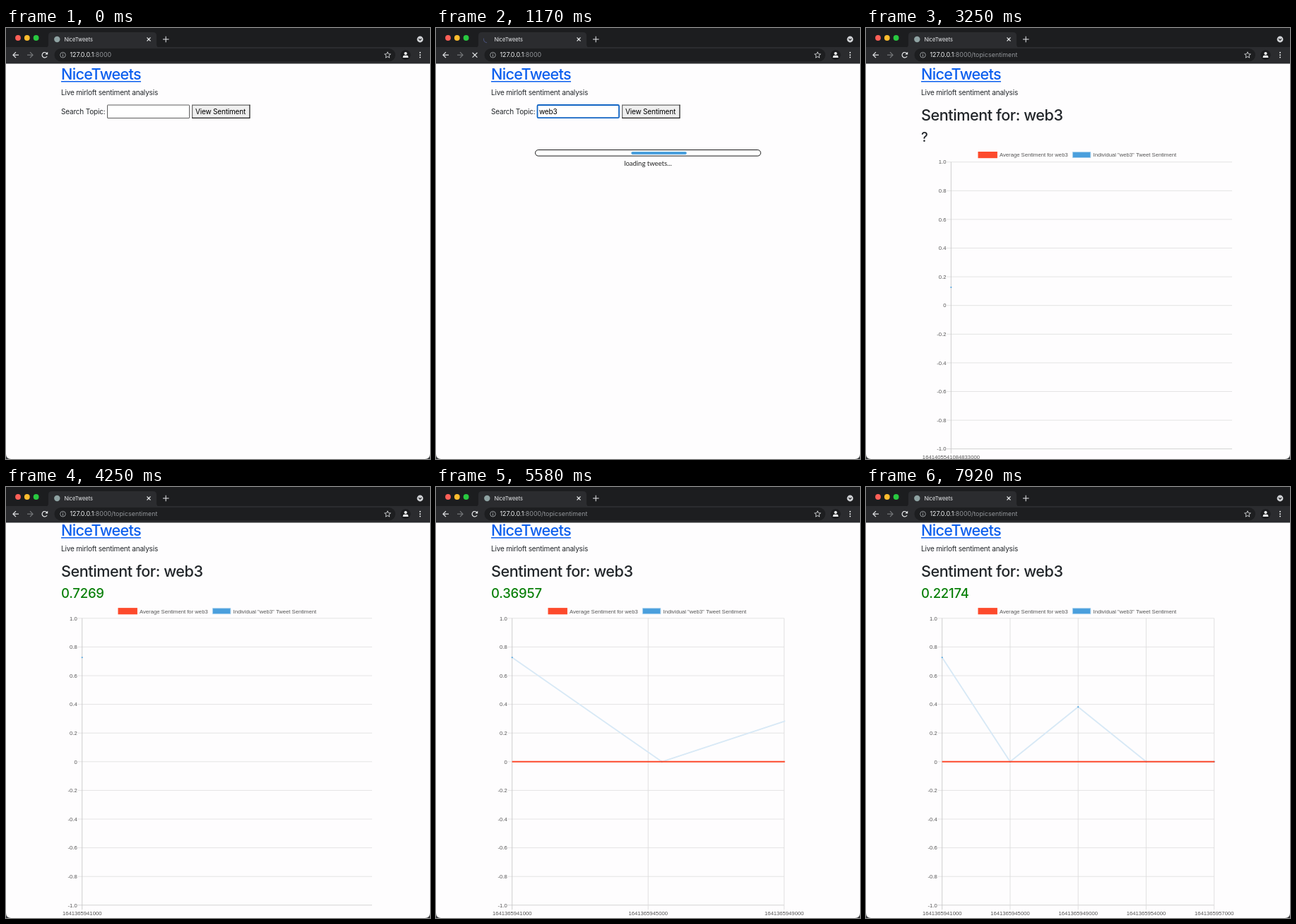
Recreate the animation shown at these times as an HTML page with a canvas. Size 600x610 px, loop 8000 ms.

```html
<!DOCTYPE html>
<html lang="en">
<head>
<meta charset="utf-8">
<title>NiceTweets</title>
<style>
html, body { margin: 0; width: 100%; height: 100%; overflow: hidden; background: #1d1e20; }
canvas { display: block; width: 600px; height: 610px; }
</style>
</head>
<body>
<canvas id="stage"></canvas>
<script>
const W = 600, H = 610, LOOP = 8000;
const canvas = document.getElementById('stage');
const dpr = window.devicePixelRatio || 1;
canvas.width = W * dpr;
canvas.height = H * dpr;
const ctx = canvas.getContext('2d');

const UI = 'Inter, "Open Sans", sans-serif';
const CHART = '"Liberation Sans", Arial, sans-serif';
const INK = '#212529', BLUE = '#4a9fdd', RED = '#fd4a2c';

// moments in ms
const FOCUS = 80, KEYS = [250, 340, 420, 500], SUBMIT = 876, LOADED = 3200, SCROLL = 3800;

// ---------- helpers ----------
function text(str, x, y, font, color, opt = {}) {
  ctx.font = font;
  ctx.fillStyle = color;
  ctx.textAlign = opt.align || 'left';
  ctx.letterSpacing = (opt.space || 0) + 'px';
  ctx.fillText(str, x, y);
  const width = ctx.measureText(str).width;
  ctx.letterSpacing = '0px';
  return width;
}

function rect(x, y, w, h, color) {
  ctx.fillStyle = color;
  ctx.fillRect(x, y, w, h);
}

function round(x, y, w, h, r, fill, stroke, lw = 1) {
  ctx.beginPath();
  ctx.roundRect(x, y, w, h, r);
  if (fill) { ctx.fillStyle = fill; ctx.fill(); }
  if (stroke) { ctx.strokeStyle = stroke; ctx.lineWidth = lw; ctx.stroke(); }
}

function disc(x, y, r, color) {
  ctx.beginPath();
  ctx.arc(x, y, r, 0, Math.PI * 2);
  ctx.fillStyle = color;
  ctx.fill();
}

function arc(x, y, r, from, to, color, lw) {
  ctx.beginPath();
  ctx.arc(x, y, r, from, to);
  ctx.strokeStyle = color;
  ctx.lineWidth = lw;
  ctx.stroke();
}

function path(points, color, lw) {
  ctx.beginPath();
  points.forEach(([x, y], i) => i ? ctx.lineTo(x, y) : ctx.moveTo(x, y));
  ctx.strokeStyle = color;
  ctx.lineWidth = lw;
  ctx.stroke();
}

function cross(x, y, r, color, lw) {
  path([[x - r, y - r], [x + r, y + r]], color, lw);
  path([[x + r, y - r], [x - r, y + r]], color, lw);
}

const clamp = v => Math.max(0, Math.min(1, v));
const mix = (a, b, k) => a + (b - a) * k;
const outQuart = p => 1 - Math.pow(1 - clamp(p), 4);

// ---------- browser window ----------
function arrow(x, y, dir, color) {
  path([[x - 4 * dir, y], [x + 4 * dir, y]], color, 1.2);
  path([[x, y - 4], [x + 4 * dir, y], [x, y + 4]], color, 1.2);
}

function star(x, y, r) {
  const pts = [];
  for (let i = 0; i <= 10; i++) {
    const a = -Math.PI / 2 + i * Math.PI / 5, q = i % 2 ? r * 0.45 : r;
    pts.push([x + q * Math.cos(a), y + q * Math.sin(a)]);
  }
  path(pts, '#d5d7da', 0.9);
}

function drawTab(t, busy) {
  rect(0, 0, W, 28, '#1c1d1f');
  ['#fe5f57', '#febc2e', '#28c840'].forEach((c, i) => disc(17 + i * 12.8, 14, 3.9, c));

  ctx.beginPath();
  ctx.moveTo(55, 28);
  ctx.quadraticCurveTo(60, 28, 60, 23);
  ctx.lineTo(60, 11);
  ctx.quadraticCurveTo(60, 6, 65, 6);
  ctx.lineTo(208, 6);
  ctx.quadraticCurveTo(213, 6, 213, 11);
  ctx.lineTo(213, 23);
  ctx.quadraticCurveTo(213, 28, 218, 28);
  ctx.fillStyle = '#2b2c2f';
  ctx.fill();

  if (busy) {
    const a = Math.PI * 0.5 - (t - 1170) / 910 * Math.PI * 3.8;
    arc(72, 16, 4.6, a, a + Math.PI * 0.6, '#464e72', 1.1);
  } else {
    disc(72.3, 16, 4.2, '#8fa3a3');
  }
  text('NiceTweets', 82.5, 18.8, '7.4px ' + UI, '#eceef0');
  cross(202, 16, 2.5, '#e6e8ea', 1.1);
  path([[222, 16], [230.5, 16]], '#d5d7da', 1.1);
  path([[226.2, 11.8], [226.2, 20.2]], '#d5d7da', 1.1);
  disc(586, 16, 4.4, '#cfd1d4');
  path([[584, 15.2], [586, 17.2], [588, 15.2]], '#1c1d1f', 1.2);
}

function drawToolbar(busy, url) {
  rect(0, 27, W, 23.5, '#2b2c2f');
  arrow(14, 38.2, -1, '#e6e8ea');
  arrow(34, 38.2, 1, '#77797c');
  if (busy) {
    cross(55, 38.2, 3.4, '#e6e8ea', 1.2);
  } else {
    arc(54.8, 38.2, 3.7, 0.5, Math.PI * 1.8, '#e6e8ea', 1.2);
    ctx.beginPath();
    ctx.moveTo(59.2, 33.8);
    ctx.lineTo(59.2, 37.6);
    ctx.lineTo(55.4, 37.6);
    ctx.fillStyle = '#e6e8ea';
    ctx.fill();
  }
  round(68.5, 29, 482.5, 18.5, 9.2, '#1d1e20');
  arc(80.5, 38.2, 3.8, 0, 7, '#a2a5a9', 0.9);
  rect(80, 37.6, 1, 2.8, '#a2a5a9');
  rect(80, 35.8, 1, 1, '#a2a5a9');
  const font = '8.9px ' + UI;
  const w = text('127.0.0.1', 90.5, 41.4, font, '#f1f3f4');
  text(url, 90.5 + w, 41.4, font, '#93969a');
  star(540, 38.4, 4.6);
  disc(565.5, 38.2, 7, '#1b1c1e');
  disc(565.5, 36, 2.1, '#f1f3f4');
  round(561.6, 38.8, 7.8, 3.2, [2.4, 2.4, 0.5, 0.5], '#f1f3f4');
  for (const y of [34.8, 38.2, 41.6]) disc(586, y, 1, '#e6e8ea');
}

function drawCorners() {
  ctx.fillStyle = '#37383b';
  for (const s of [0, 1]) {
    const x = s * W, d = s ? -7 : 7;
    ctx.beginPath();
    ctx.moveTo(x, H - 7);
    ctx.quadraticCurveTo(x, H, x + d, H);
    ctx.lineTo(x, H);
    ctx.fill();
  }
}

// ---------- page ----------
function drawHeader() {
  const w = text('NiceTweets', 78, 73, '500 21.6px ' + UI, '#0b5fee', { space: -0.67 });
  rect(78, 75, w, 1.5, '#0b5fee');
  text('Live mirloft sentiment analysis', 78, 94.6, '10px ' + UI, INK, { space: -0.18 });
}

function drawForm(t) {
  const font = '10px ' + UI, tight = { space: -0.18 };
  text('Search Topic:', 78, 122, font, INK, tight);
  const focus = t >= FOCUS;
  if (focus) round(143.5, 109, 115.5, 18.2, 1.5, '#fff', '#1265c4', 1.8);
  else round(143.5, 109, 116, 18.5, 0.5, '#fff', '#5d5d5d', 1);

  const typed = 'web3'.slice(0, KEYS.filter(k => t >= k).length);
  const w = text(typed, 146, 122, font, '#000', tight);
  const typing = t > KEYS[0] - 80 && t < KEYS[3] + 120;
  if (focus && (typing || Math.floor(t / 125) % 2 === 0)) rect(146 + w, 112.5, 0.8, 11.5, '#000');

  rect(263, 108.5, 82.5, 19.5, '#efefef');
  path([[263.6, 128], [263.6, 109.1], [345.5, 109.1]], '#6b6b6b', 1.2);
  path([[263.2, 127.4], [344.9, 127.4], [344.9, 108.7]], '#1c1c1c', 1.2);
  text('View Sentiment', 268, 122, font, '#000', tight);
}

function drawLoader(t) {
  round(140.5, 172.5, 319, 8.6, 4.3, '#fff', '#1a1a1a', 1);
  const u = (t - SUBMIT) / 522 % 2;
  const x = 144 + 234 * (u < 1 ? u : 2 - u);
  round(x, 174.9, 78.5, 4, 2, BLUE);
  text('loading tweets...', 300, 195.2, '9.5px Lato, "Open Sans", sans-serif', '#222', { align: 'center' });
}

// ---------- chart ----------
const scores = [0.7269, 0, 0.3818, 0, 0];
const seconds = [41, 45, 49, 54, 57];
const labels = seconds.map(s => '16413659' + s + '000');
const TOP = 189.7, UNIT = 203, ZERO = TOP + UNIT, BOTTOM = ZERO + UNIT, DURATION = 300;
const steps = [
  { at: 3237, n: 1, first: '1641405541084833000', left: 120.4 },
  { at: 3460, n: 1 },
  { at: 4460, n: 2 },
  { at: 5450, n: 3 },
  { at: 6380, n: 4 },
  { at: 7380, n: 5 }
];
const leftOf = s => s.left || 107.7;
const rightOf = s => s.n > 1 ? 492.7 : 518;
const xOf = (s, i) => leftOf(s) + i * (rightOf(s) - leftOf(s)) / Math.max(s.n - 1, 1);

function average(s) {
  if (s.first) return '?';
  const sum = scores.slice(0, s.n).reduce((a, b) => a + b, 0);
  return String(+(sum / s.n + 1e-9).toFixed(5));
}

function drawLegend() {
  const font = '7.68px ' + CHART;
  round(158.5, 175, 27.4, 9.2, 0, RED);
  text('Average Sentiment for web3', 189, 182.4, font, '#555');
  round(292.4, 175.6, 25.4, 7.9, 0, BLUE, '#a9d2ef', 0.9);
  text('Individual "web3" Tweet Sentiment', 321.5, 182.4, font, '#555');
}

function drawGrid(s) {
  const font = '7.68px ' + CHART, left = leftOf(s), right = rightOf(s);
  for (let i = 0; i <= 10; i++) {
    const v = 1 - i / 5, y = ZERO - v * UNIT;
    const name = i === 5 ? '0' : v.toFixed(1);
    path([[left - 6.4, y], [right, y]], i === 10 ? '#cfcfcf' : '#e1e1e1', 0.9);
    text(name, left - 7, y + 2.7, font, '#555', { align: 'right' });
  }
  for (let i = 0; i < s.n; i++) {
    const x = xOf(s, i);
    path([[x, TOP], [x, BOTTOM + 6.4]], i ? '#dedede' : '#c9c9c9', 0.9);
    text(i === 0 && s.first || labels[i], x, BOTTOM + 14, font, '#555', { align: 'center' });
  }
  if (s.n === 1) path([[right, BOTTOM], [right, BOTTOM]], '#e1e1e1', 0.9);
}

function drawLines(s, prev, k) {
  const pts = [];
  for (let i = 0; i < s.n; i++) {
    const fresh = !prev || i >= prev.n;
    const y = ZERO - scores[i] * UNIT * (fresh ? k : 1);
    pts.push([mix(xOf(prev || s, i), xOf(s, i), k), y]);
  }
  const right = rightOf(s);
  ctx.save();
  ctx.beginPath();
  ctx.rect(leftOf(s) - 1, TOP - 1, right - leftOf(s) + 2.4, BOTTOM - TOP + 2);
  ctx.clip();
  ctx.lineJoin = 'round';
  path(pts, '#d8e9f6', 1.9);
  ctx.restore();
  for (const [x, y] of pts) if (x <= right * 1.01) disc(x, y, 1, BLUE);
  if (s.n > 1) {
    const end = Math.min(pts[s.n - 1][0] + 0.6, right + 1);
    path([[pts[0][0], ZERO], [end, ZERO]], RED, 2);
  }
}

function drawResult(t) {
  let i = steps.length - 1;
  while (i > 0 && t < steps[i].at) i--;
  const s = steps[i];
  text('Sentiment for: web3', 78, 131, '500 21.6px ' + UI, INK, { space: -0.43 });
  const score = average(s);
  text(score, 78, 160.6, '500 18.5px ' + UI, score === '?' ? INK : '#0a800a', { space: -0.2 });
  drawLegend();
  drawGrid(s);
  drawLines(s, steps[i - 1], outQuart((t - s.at) / DURATION));
}

// ---------- loop ----------
function draw(t) {
  const busy = t >= SUBMIT && t < LOADED, result = t >= LOADED;
  ctx.setTransform(dpr, 0, 0, dpr, 0, 0);
  rect(0, 0, W, H, '#fefdfe');
  ctx.save();
  ctx.translate(0, t >= SCROLL ? -3.9 : 0);
  drawHeader();
  if (result) {
    drawResult(t);
  } else {
    drawForm(t);
    if (busy) drawLoader(t);
  }
  ctx.restore();
  drawTab(t, busy);
  drawToolbar(busy, result ? ':8000/topicsentiment' : ':8000');
  drawCorners();
}

function tick() {
  draw(performance.now() % LOOP);
  requestAnimationFrame(tick);
}
tick();
</script>
</body>
</html>
```
